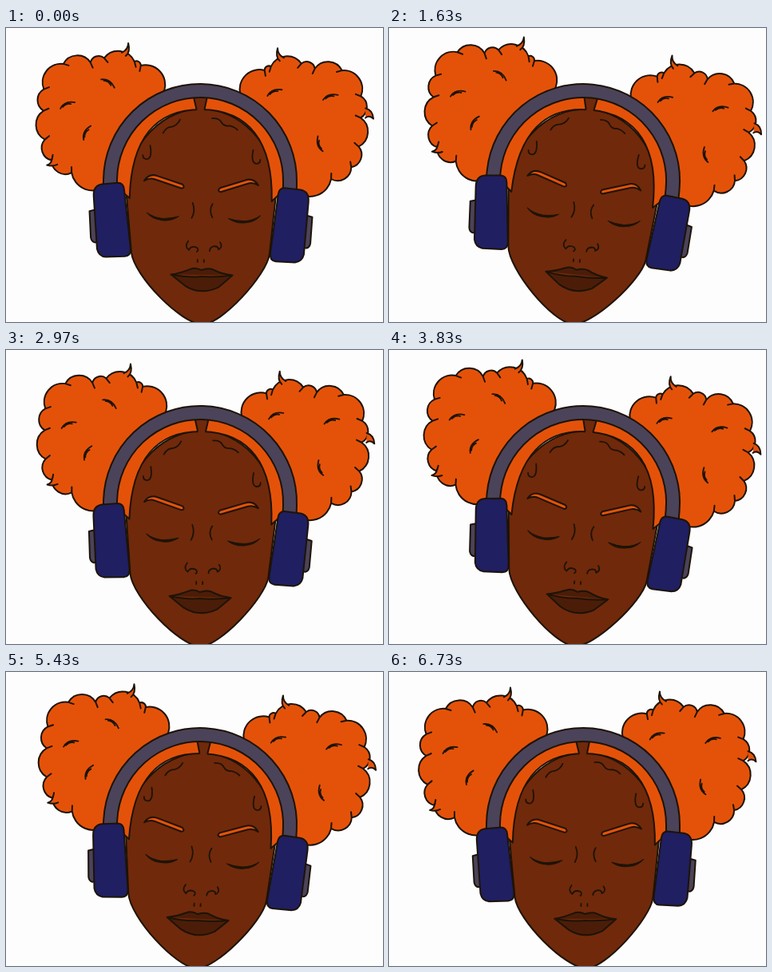
Recreate the animation shown at these times as an HTML page. Size 472 px wide and 368 px high, loop 6.76 s.

```html
<!DOCTYPE html>
<html lang="en">
<head>
<meta charset="utf-8">
<title>Head swaying to music</title>
<style>
html, body { margin: 0; width: 100%; height: 100%; overflow: hidden; background: #fdfdfe; }
svg { display: block; width: 472px; height: 368px; }
path { stroke: #1d1306; stroke-width: 2; stroke-linejoin: round; stroke-linecap: round; }
.line { fill: none; stroke-width: 1.8; }
.hair { fill: #e4520a; }
.skin { fill: #70290b; }
.lips { fill: #4b1d08; }
.cup { fill: #1f1f62; }
.metal { fill: #4b4359; }
.ink { fill: #1d1306; stroke-width: 1; }
</style>
</head>
<body>
<svg viewBox="0 0 472 368">
  <defs>
    <g id="puff">
      <path id="lobes" class="hair"/>
      <path class="hair" d="M143 32Q151 28 151 20Q154 31 148 36"/>
    </g>
    <path id="curl" class="line" d="M-9 4Q-4 -6 9 -4M-6 2Q-2 -3 4 -2"/>
    <path id="eye" class="ink" d="M-20 -4Q-12 2 0 3Q10 3 20 0Q10 7 -2 5Q-13 4 -20 -4Z"/>
    <!-- brow, hairline hook, headphone cup: one side of the face -->
    <g id="side">
      <path class="hair" d="M173 192Q179 182 190 186L221 196Q225 200 220 201L186 190Q180 188 173 192Z"/>
      <path class="line" d="M180 148Q183 164 176 165Q171 165 171 160"/>
      <path class="metal" d="M105 231L112 229L118 269L112 270Q108 269 107 264Z"/>
      <path class="cup" d="M120 197L140 195Q147 195 148 203L157 277Q158 286 150 287L126 288Q117 287 115 278L110 212Q109 199 120 197Z"/>
    </g>
  </defs>

  <g id="head">
    <use href="#puff"/>
    <use href="#puff" class="mirror"/>
    <path class="hair" d="M57 166Q57 172 51 174Q58 176 64 173M449 98Q458 100 459 111Q454 106 449 110"/>
    <g id="curls"></g>

    <path class="skin" d="M150 200L158 282C162 312 222 371 248 371C272 371 328 308 331 282L339 200A95 110 0 0 0 150 200Z"/>
    <path class="hair" d="M134 196A109 109 0 0 1 354 196L333 216C334 140 302 102 244 102S156 140 155 214Z"/>
    <path class="skin" d="M233 84L238 104H247L251 84" stroke-dasharray="18 14"/>

    <path class="line" d="M196 132Q200 124 207 124Q214 122 217 115M257 113Q266 112 269 118Q272 123 279 122Q285 123 289 127"/>
    <use href="#eye" x="197" y="236"/>
    <use href="#eye" transform="translate(299 238) scale(-1 1)"/>
    <path class="line" d="M234 219Q238 229 233 238M259 220Q254 228 259 237M229 267Q224 274 230 278Q233 272 240 275Q243 278 240 280M256 279Q256 274 262 273Q267 273 267 277Q273 274 269 268M241 290v3M249 290v3"/>
    <path class="lips" d="M208 309Q217 308 232 302Q238 299 246 303Q254 300 260 302Q272 308 285 309Q275 318 268 324Q246 335 226 323Q217 316 208 309Q230 313 246 311Q265 312 285 309"/>

    <path class="metal" d="M122 200V191A121 121 0 0 1 364 191V206H347V191A104 104 0 0 0 139 191V200Z"/>
    <use href="#side"/>
    <use href="#side" class="mirror"/>
  </g>
</svg>
<script>
const LOOP = 6760, SWAY = 1245, PEAK = 250;
const byId = id => document.getElementById(id);

// Joins points with outward round lobes; each lobe's edge runs on into a short crease.
function lobes(points) {
  let outline = `M${points[0]}`, creases = '';
  for (let i = 1; i < points.length; i++) {
    const [px, py] = points[i - 1], [x, y] = points[i];
    const dx = x - px, dy = y - py, r = 0.58 * Math.hypot(dx, dy);
    const a = Math.atan2(dy, dx) + 1.2;
    outline += `A${r} ${r} 0 0 1 ${x} ${y}`;
    creases += `M${x} ${y}l${7 * Math.cos(a)} ${7 * Math.sin(a)}`;
  }
  return outline + 'L170 130Z' + creases;
}

byId('lobes').setAttribute('d', lobes([
  [126, 199], [82, 183], [57, 168], [48, 142], [46, 106], [46, 79], [70, 47],
  [104, 45], [121, 39], [159, 43], [167, 48], [197, 78]
]));

for (const m of document.querySelectorAll('.mirror'))
  m.setAttribute('transform', 'matrix(-1 0 0 1 489 4)');

const curls = [[126, 71, 55], [76, 99, 0], [101, 133, -40], [335, 80, 0], [405, 85, 5], [393, 143, -85]];
byId('curls').innerHTML = curls.map(([x, y, turn]) =>
  `<use href="#curl" transform="translate(${x} ${y}) rotate(${turn})"/>`).join('');

function draw(now) {
  const t = now % LOOP;
  const angle = 11 * Math.cos(2 * Math.PI * (t - PEAK) / SWAY) - 2.7;
  byId('head').setAttribute('transform', `rotate(${angle.toFixed(3)} 243 192)`);
  requestAnimationFrame(draw);
}
draw(0);
</script>
</body>
</html>
```
